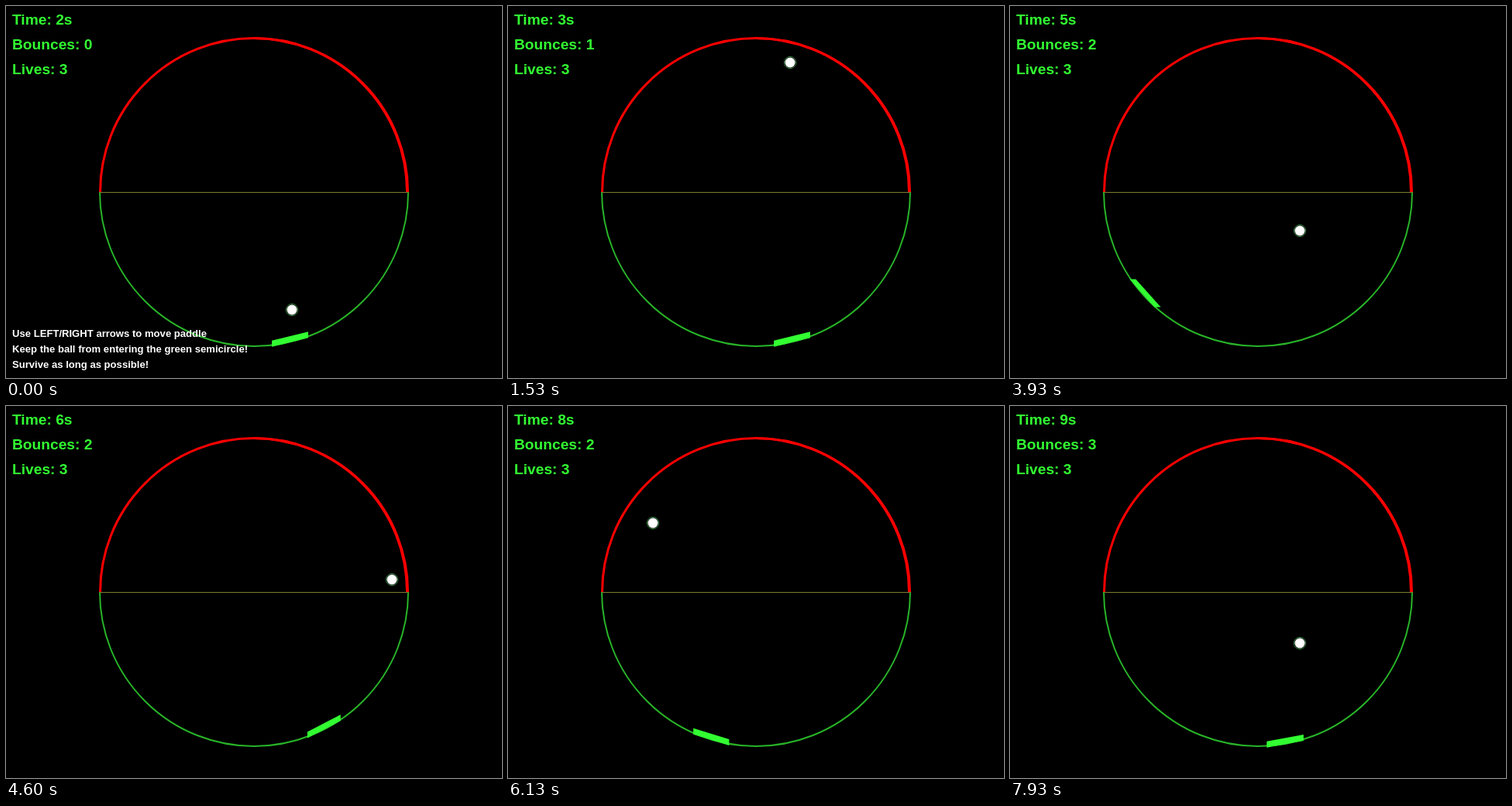
An HTML page with a canvas that plays this animation: 640 px wide and 480 px high, repeating every 8000 ms.

```html
<!DOCTYPE html>
<html lang="en">
<head>
<meta charset="utf-8">
<title>Semicircle paddle game</title>
<style>
html, body { margin: 0; width: 100%; height: 100%; overflow: hidden; background: #000; }
canvas { display: block; }
</style>
</head>
<body>
<canvas id="stage" width="640" height="480"></canvas>
<script>
const ctx = document.getElementById('stage').getContext('2d');
const LOOP = 8000, FPS = 15, GAME_TICK = 16;
const CX = 320, CY = 240, R = 200;
const BALL_R = 8, RIM = R - BALL_R;
const PADDLE_R = 197, PADDLE_HALF = 0.123, PADDLE_STEP = 0.06;
const NEON = '#32ff32';
const rad = degrees => degrees * Math.PI / 180;

// From one paddle hit to the next the ball crosses equal chords,
// each turning its rim point by the same number of degrees.
const FIRST_RIM_ANGLE = 242.9;
const volleys = [
  { start: -1400, turn: 188.4, chords: 1 },
  { start: 131, turn: 211.75, chords: 2 },
  { start: 3091, turn: 221.6, chords: 3 },
  { start: 7440, turn: 218.6, chords: 1 },
  { start: 8870 }
];

// Key presses: [ms, steps to reach], counted clockwise from the lowest point
const paddleMoves = [
  [1850, 9], [2800, 14], [4000, -8], [4800, -2], [5600, 5], [6300, -10], [7100, -3]
];

function rimPoint(degrees) {
  return [CX + RIM * Math.cos(rad(degrees)), CY + RIM * Math.sin(rad(degrees))];
}

function currentVolley(t) {
  return volleys.filter(v => v.start <= t).length - 1;
}

function ballAt(t) {
  const index = currentVolley(t);
  const { start, turn, chords } = volleys[index];
  const progress = (t - start) / (volleys[index + 1].start - start) * chords;
  const chord = Math.floor(progress), u = progress - chord;
  const angle = volleys.slice(0, index)
    .reduce((sum, v) => sum + v.turn * v.chords, FIRST_RIM_ANGLE) + turn * chord;
  const from = rimPoint(angle), to = rimPoint(angle + turn);
  return from.map((v, i) => v + (to[i] - v) * u);
}

function paddleAt(t) {
  return paddleMoves.reduce((steps, [start, goal]) => {
    const reach = Math.max(0, t - start) / GAME_TICK;
    return steps + Math.max(-reach, Math.min(reach, goal - steps));
  }, -4);
}

function arc(x, y, r, from, to, color, width) {
  ctx.beginPath();
  ctx.arc(x, y, r, from, to);
  ctx.strokeStyle = color;
  ctx.lineWidth = width;
  ctx.stroke();
}

function disc(x, y, r, color) {
  ctx.beginPath();
  ctx.arc(x, y, r, 0, 2 * Math.PI);
  ctx.fillStyle = color;
  ctx.fill();
}

function text(lines, size, color, y, pitch) {
  ctx.font = `bold ${size}px "Liberation Sans", Arial, sans-serif`;
  ctx.fillStyle = color;
  lines.forEach((line, i) => ctx.fillText(line, 8, y + i * pitch));
}

function drawArena() {
  arc(CX, CY, R - 1, 0, Math.PI, '#28b428', 2);
  arc(CX, CY, R - 1.5, Math.PI, 2 * Math.PI, '#f00', 3);
  // The red rim thickens towards its right end
  arc(CX - 1, CY, R - 1.5, -Math.PI / 2, 0, '#f00', 3);
  ctx.fillStyle = '#7c7c32';
  ctx.fillRect(CX - R + 1, CY, 2 * R - 1, 1);
}

// Thick line whose ends are cut along an axis
function drawPaddle(steps) {
  const angle = Math.PI / 2 + Math.round(steps) * PADDLE_STEP;
  const [a, b] = [PADDLE_HALF, -PADDLE_HALF].map(d => [
    CX + PADDLE_R * Math.cos(angle + d),
    CY + PADDLE_R * Math.sin(angle + d)
  ]);
  const steep = Math.abs(b[1] - a[1]) > Math.abs(b[0] - a[0]);
  const dx = steep ? 4 : 0, dy = steep ? 0 : 4;
  ctx.fillStyle = NEON;
  ctx.beginPath();
  ctx.moveTo(a[0] - dx, a[1] - dy);
  ctx.lineTo(b[0] - dx, b[1] - dy);
  ctx.lineTo(b[0] + dx, b[1] + dy);
  ctx.lineTo(a[0] + dx, a[1] + dy);
  ctx.fill();
}

function drawBall(position) {
  const [x, y] = position.map(Math.round);
  disc(x, y, BALL_R, '#000');
  arc(x, y, BALL_R - 0.4, 0, 2 * Math.PI, '#3c8c46', 1);
  disc(x, y, BALL_R - 1.5, '#fff');
}

function draw(t) {
  const seconds = Math.floor(2.03 + t / 1000);
  ctx.fillStyle = '#000';
  ctx.fillRect(0, 0, 640, 480);
  drawArena();
  drawPaddle(paddleAt(t));
  drawBall(ballAt(t));
  text([`Time: ${seconds}s`, `Bounces: ${currentVolley(t)}`, 'Lives: 3'], 19.2, NEON, 24, 32);
  if (seconds < 3) {
    text([
      'Use LEFT/RIGHT arrows to move paddle',
      'Keep the ball from entering the green semicircle!',
      'Survive as long as possible!'
    ], 13.1, '#fff', 427, 20);
  }
}

const start = performance.now();
function tick() {
  const t = (performance.now() - start) % LOOP;
  const step = Math.floor((t + 4) * FPS / 1000) % (LOOP * FPS / 1000);
  draw(Math.round(step * 100 / FPS) * 10);
  requestAnimationFrame(tick);
}
tick();
</script>
</body>
</html>
```
